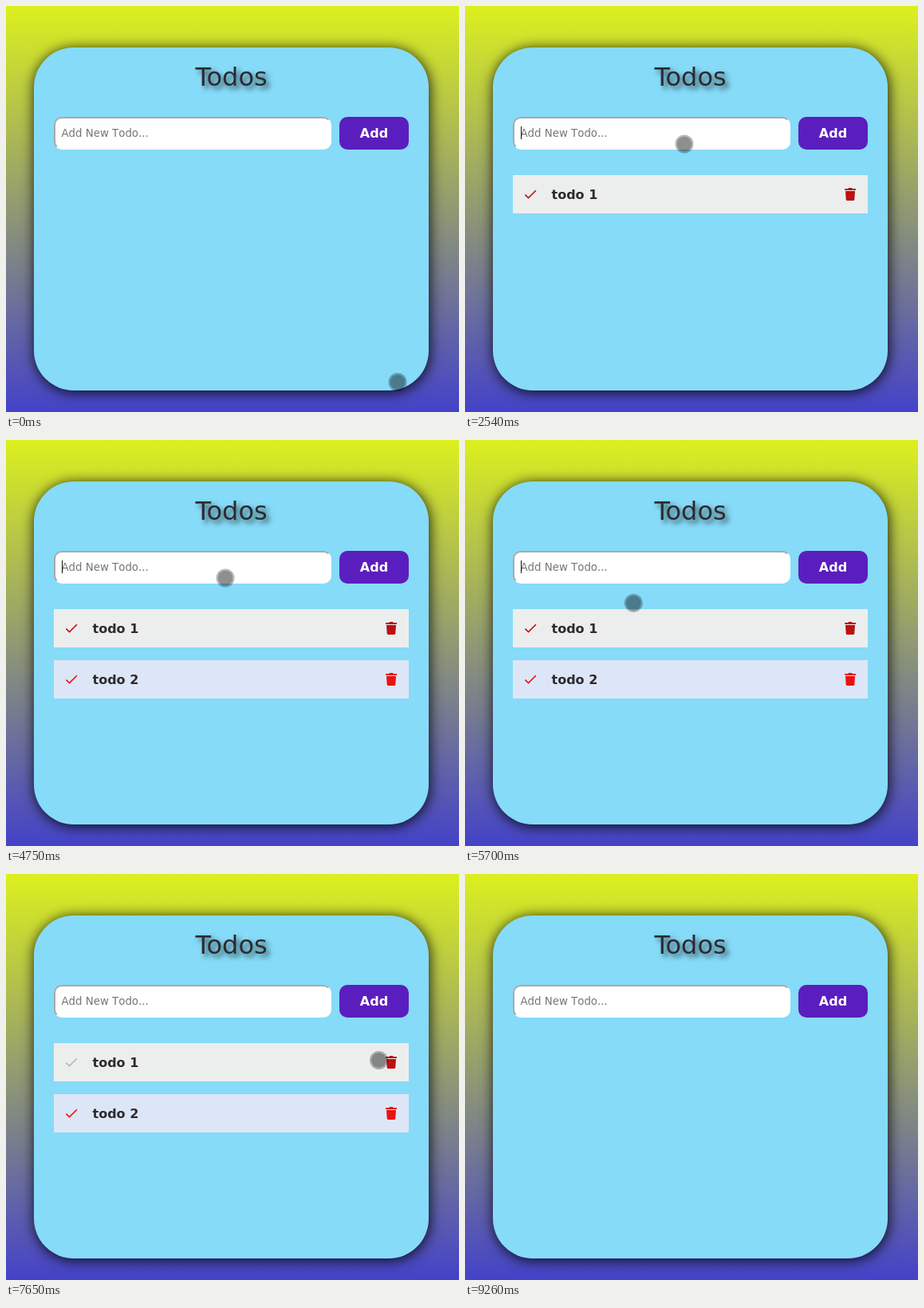
An HTML page that plays this animation: 568 px wide and 509 px high, repeating every 9660 ms.

```html
<!DOCTYPE html>
<html lang="en">
<head>
<meta charset="utf-8">
<title>Todos</title>
<style>
html, body { margin: 0; width: 100%; height: 100%; overflow: hidden; }
body {
  position: relative;
  background: linear-gradient(#dcf01e, #4442c8);
  font: 16px 'DejaVu Sans', sans-serif;
  color: #2e2a2e;
}
body * { position: absolute; box-sizing: border-box; white-space: pre; }
.card {
  left: 35px; top: 52px; width: 495px; height: 430px;
  border-radius: 50px;
  background: #86dbf8;
  box-shadow: 1px 2px 16px 1px rgba(0, 0, 0, .8);
}
h1 {
  left: 35px; top: 71px; width: 495px; margin: 0;
  font-size: 32px; font-weight: 400; line-height: 37px; text-align: center;
  text-shadow: 4px 4px 6px rgba(0, 0, 0, .65);
}
.field {
  left: 60px; top: 139px; width: 348px; height: 41px;
  border: 2px solid; border-color: #a9a9a9 #fff #fff #a9a9a9;
  border-radius: 10px;
  background: #fff;
  font-size: 13.333px; line-height: 37px; font-kerning: none;
}
#text { left: 7.5px; top: 0; color: #222; }
#text.empty { color: #757575; }
#caret { left: 70px; top: 151px; width: 1px; height: 16px; background: #111; }
.add {
  left: 418px; top: 139px; width: 87px; height: 41px;
  border-radius: 10px;
  background: #5b1ebe; color: #fff;
  font-weight: 700; line-height: 41px; text-align: center;
}
.item {
  left: 60px; width: 445px; height: 48px;
  font-weight: 700; line-height: 49px;
}
#row0 { top: 212px; background: #eceeee; fill: #ba1212; }
#row1 { top: 276px; background: #dde6f7; fill: #ec1111; }
.item b { left: 48.5px; top: 0; font-weight: inherit; }
.struck b { font-weight: 400; text-decoration: line-through; }
.check { left: 12px; top: 14px; width: 20px; height: 20px; }
.grey .check { fill: #b9b4b4; }
.trash { left: 415.5px; top: 16px; width: 14px; height: 16px; }
#cursor {
  left: -11.5px; top: -11.5px; width: 23px; height: 23px;
  border: 2px solid rgba(0, 0, 0, .28); border-radius: 50%;
  background: rgba(0, 0, 0, .44); background-clip: padding-box;
}
</style>
</head>
<body>
<div class="card"></div>
<h1>Todos</h1>
<div class="field"><span id="text"></span></div>
<div id="caret"></div>
<div class="add">Add</div>
<div id="row0" class="item"></div>
<div id="row1" class="item"></div>
<div id="cursor"></div>
<script>
const LOOP = 9660;
const $ = id => document.getElementById(id);
const [text, caret, cursor, row0, row1] = ['text', 'caret', 'cursor', 'row0', 'row1'].map($);

const icons = `
<svg class="check" viewBox="0 0 24 24"><path d="M9 16.2 4.8 12 3.4 13.4 9 19 21 7 19.6 5.6z"/></svg>
<b></b>
<svg class="trash" viewBox="0 0 14 16"><path d="M5 0h4l.7 1H13.500a.5.5 0 0 1 .5.5V3H0V1.500A.5.5 0 0 1 .5 1H4.300zM1 4h12l-.7 10.600A1.500 1.500 0 0 1 10.800 16H3.200A1.500 1.500 0 0 1 1.700 14.600z"/></svg>`;
row0.innerHTML = row1.innerHTML = icons.replace(/\n/g, '');

// Times at which each letter lands, then the time of Enter
const entries = [
  { label: 'todo 1', keys: [1540, 1670, 1870, 2000, 2070, 2340], done: 2540 },
  { label: 'todo 2', keys: [3360, 3490, 3690, 3890, 4020, 4480], done: 4750 }
];
const caretOn = [[940, 1340], [1540, 2810], [3290, 5020], [5500, 5820]];

const smooth = u => u * u * (3 - 2 * u);
const speedUp = u => u ** 1.6;

// Pointer moves: start, time of last step, steps, target, sag, easing
const home = [490.5, 471];
const moves = [
  [70, 940, 12, [274.5, 172.5], 5, smooth],
  [5350, 6310, 13, [81.5, 241], 10, smooth],
  [6840, 7650, 12, [467, 233], 0, smooth],
  [7780, 7780, 1, [468.5, 233], 0, smooth],
  [7850, 8180, 5, [482, 236], 0, smooth],
  [8580, 9260, 9, [545, 525], 0, speedUp]
];

const within = (t, a, b) => t >= a && t < b;

function pointer(t) {
  let from = home;
  for (const [start, end, steps, to, sag, ease] of moves) {
    if (t < start) break;
    if (t < end) {
      const gap = (end - start) / (steps - 1);
      const u = ease((Math.floor((t - start) / gap) + 1) / steps);
      return [
        from[0] + (to[0] - from[0]) * u,
        from[1] + (to[1] - from[1]) * u + sag * 4 * u * (1 - u)
      ];
    }
    from = to;
  }
  return from;
}

function typed(t) {
  const entry = entries.find(e => t < e.done);
  return entry ? entry.label.slice(0, entry.keys.filter(k => k <= t).length) : '';
}

function showRow(row, label, visible) {
  row.style.visibility = visible ? 'visible' : 'hidden';
  row.querySelector('b').textContent = label;
}

function draw(t) {
  const value = typed(t);
  text.textContent = value || 'Add New Todo...';
  text.className = value ? '' : 'empty';

  const x = value ? text.getBoundingClientRect().width : 0;
  caret.style.transform = `translateX(${Math.round(x)}px)`;
  caret.style.visibility = caretOn.some(([a, b]) => within(t, a, b)) ? 'visible' : 'hidden';

  showRow(row0, t < 8180 ? 'todo 1' : 'todo 2', within(t, 2540, 8580));
  showRow(row1, 'todo 2', within(t, 4750, 8180));
  row0.classList.toggle('struck', within(t, 6310, 6840));
  row0.classList.toggle('grey', within(t, 6310, 8180));

  const [px, py] = pointer(t);
  cursor.style.transform = `translate(${px}px, ${py}px)`;
}

function tick() {
  draw(performance.now() % LOOP);
  requestAnimationFrame(tick);
}
tick();
</script>
</body>
</html>
```
